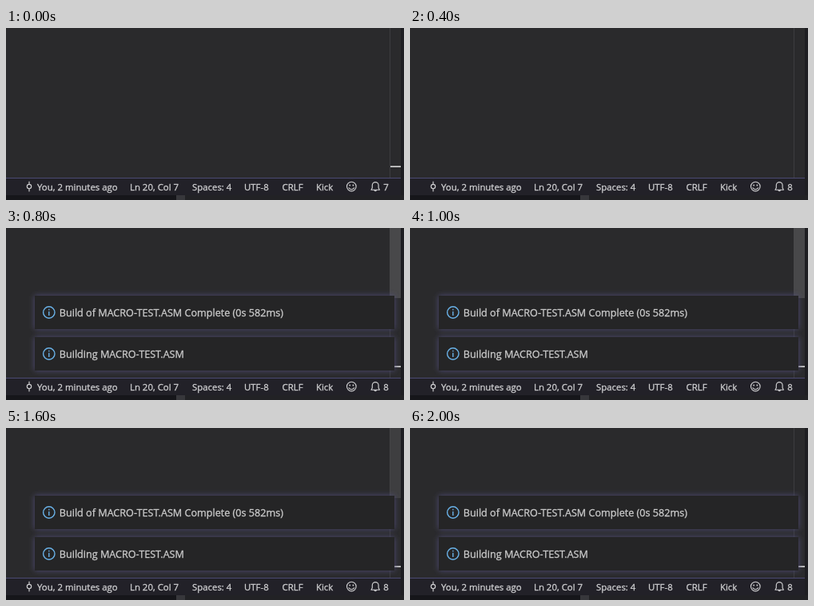
An HTML page that plays this animation: 498x216 px, repeating every 2.2 s.

```html
<!DOCTYPE html>
<html lang="en">
<head>
<meta charset="utf-8">
<title>Build notifications</title>
<style>
  html, body { margin: 0; width: 100%; height: 100%; overflow: hidden; background: #2a2a2c; }
  svg { display: block; width: 498px; height: 216px; }
  text { font-family: "Open Sans", "Noto Sans", sans-serif; white-space: pre; stroke-width: 0.3; }
  .status text { font-size: 11.4px; fill: #d0d0d2; stroke: #d0d0d2; }
  .toast text { font-size: 12.62px; fill: #cccccc; stroke: #cccccc; }
  .line { fill: none; stroke: #d0d0d2; stroke-width: 1.15; stroke-linecap: round; stroke-linejoin: round; }
  .info { fill: none; stroke: #6ab2e8; stroke-width: 1.4; }
</style>
</head>
<body>
<svg viewBox="0 0 498 216">
  <defs>
    <filter id="glow" x="-10%" y="-60%" width="120%" height="220%">
      <feGaussianBlur stdDeviation="3.6"/>
    </filter>
  </defs>

  <rect width="498" height="216" fill="#2a2a2c"/>
  <rect x="480" width="1" height="188" fill="#3c3c40"/>
  <rect id="slider" x="480" width="14" height="88" fill="#48484a"/>
  <rect id="mark" x="481" y="173" width="13" height="2" fill="#b9b9b9"/>
  <rect x="494" width="4" height="216" fill="#1e1e22"/>

  <rect y="189" width="494" height="21" fill="#222128"/>
  <rect y="188" width="494" height="1" fill="#4b4a72"/>
  <rect y="210" width="214" height="6" fill="#16161a"/>
  <rect x="214" y="210" width="284" height="6" fill="#222225"/>
  <rect x="213" y="210" width="11" height="6" fill="#37373b"/>

  <g id="toasts"></g>

  <g class="status">
    <g class="line">
      <circle cx="29" cy="199" r="2.7"/>
      <path d="M29 193V196.2M29 201.8V205"/>
      <circle cx="432.3" cy="199" r="5.8"/>
      <path d="M429 200.8Q432.3 204.6 435.6 200.8"/>
      <path d="M457 203.2H467.4L466.1 200.8V197.6A3.9 4 0 0 0 458.3 197.6V200.8ZM460.8 203.6A1.5 1.5 0 0 0 463.6 203.6"/>
    </g>
    <g fill="#d0d0d2">
      <circle cx="430.2" cy="197.5" r="0.9"/>
      <circle cx="434.4" cy="197.5" r="0.9"/>
    </g>
    <g id="labels"></g>
    <text id="count" x="472.3" y="204">7</text>
  </g>
</svg>
<script>
const LOOP = 2200, STEP = 200;
const get = id => document.getElementById(id);

const labels = [
  [39, "You, 2 minutes ago"], [155, "Ln 20, Col 7"], [233, "Spaces: 4"],
  [298, "UTF-8"], [345.5, "CRLF"], [388, "Kick"]
];
get("labels").innerHTML = labels.map(([x, s]) => `<text x="${x}" y="204">${s}</text>`).join("");

const toast = (y, message) => `
  <g class="toast" transform="translate(36 ${y})">
    <rect width="450" height="42" fill="#504e78" filter="url(#glow)"/>
    <rect width="450" height="42" fill="#252526"/>
    <circle class="info" cx="17.8" cy="21" r="7.2"/>
    <path class="info" d="M17.8 19.8V25M17.8 16.8V18.3"/>
    <text x="30.8" y="26">${message}</text>
  </g>`;
get("toasts").innerHTML =
  toast(85, "Build of MACRO-TEST.ASM Complete (0s 582ms)") +
  toast(137, "Building MACRO-TEST.ASM");

const clamp = v => Math.max(0, Math.min(1, v));

function draw(ms) {
  const t = Math.floor((ms % LOOP) / STEP) * STEP;
  const entering = t < 800;

  get("count").textContent = t < 400 ? 7 : 8;
  get("mark").setAttribute("opacity", t < 400 || t >= 800 ? 1 : 0);
  get("slider").setAttribute("opacity", t < 800 ? 0 : clamp((2000 - t) / 600));
  get("toasts").setAttribute("opacity", t < 600 ? 0 : entering ? 0.82 : 1);
  get("toasts").setAttribute("transform", `translate(0 ${entering ? 5 : 0})`);
}

const start = performance.now();
function tick() {
  draw(performance.now() - start);
  requestAnimationFrame(tick);
}
tick();
</script>
</body>
</html>
```
